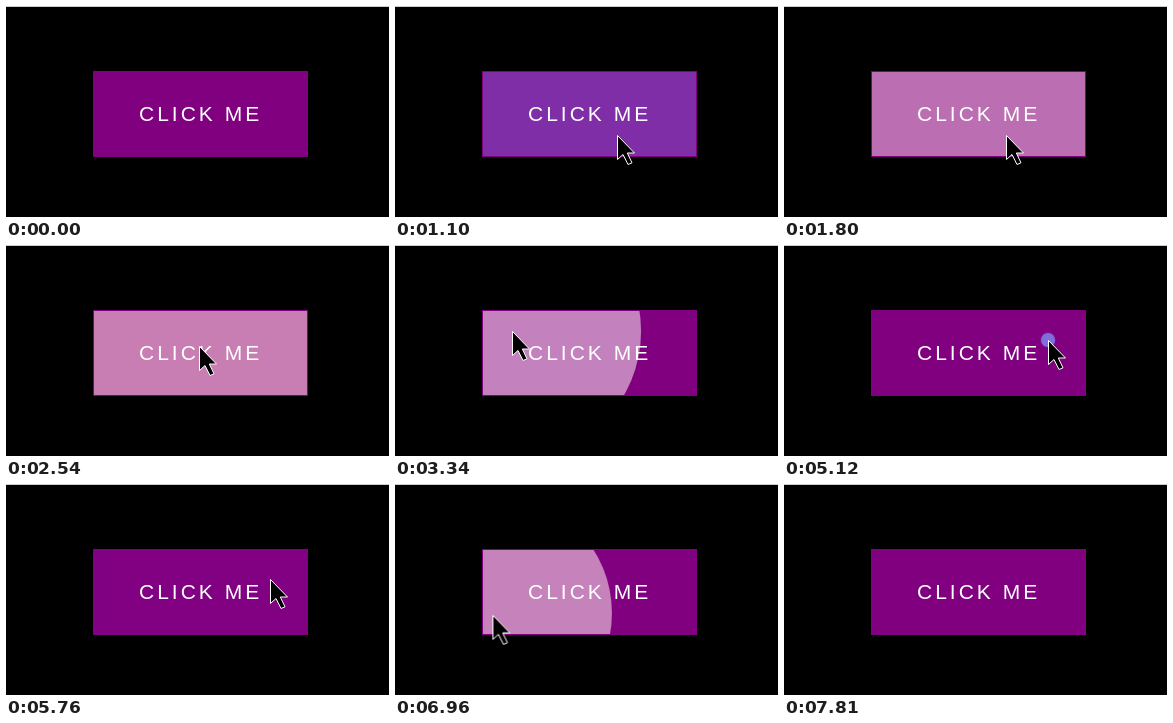
An HTML page that plays this animation: 383 px wide and 211 px high, repeating every 8.31 s.

```html
<!DOCTYPE html>
<html lang="en">
<head>
<meta charset="utf-8">
<title>Ripple button</title>
<style>
  html, body {
    margin: 0;
    width: 100%;
    height: 100%;
    overflow: hidden;
    background: #000;
  }

  .stage {
    position: relative;
    width: 383px;
    height: 211px;
    overflow: hidden;
    box-sizing: border-box;
    border-top: 1px solid #ccc;
  }

  .button {
    position: absolute;
    left: 87px;
    top: 64px;
    width: 213px;
    height: 84px;
    border: 1px solid #800080;
    background: #800080;
    overflow: hidden;
  }

  .label {
    position: absolute;
    left: 45px;
    top: 30px;
    font: 21px/24px "Liberation Sans", Arial, sans-serif;
    letter-spacing: 3px;
    white-space: nowrap;
    color: #fff;
  }

  /* --x and --y are stage coordinates of the click */
  .ripple {
    position: absolute;
    left: calc(var(--x) * 1px - 88px - 430px);
    top: calc(var(--y) * 1px - 66px - 430px);
    width: 860px;
    height: 860px;
    border-radius: 50%;
    background: var(--c);
    opacity: 0;
    animation: ripple 8310ms linear calc(var(--t) * 1ms) infinite;
  }

  @keyframes ripple {
    0% { transform: scale(0); opacity: 1; }
    7.94%, 100% { transform: scale(1); opacity: 0; }
  }

  .cursor {
    position: absolute;
    left: 0;
    top: -1px;
    width: 20px;
    height: 32px;
    transform: translate(400px, 250px);
    animation: move 8310ms ease-in-out infinite;
  }

  @keyframes move {
    0%, 1.91% { transform: translate(400px, 250px); }
    1.92% { transform: translate(289px, 197px); }
    5.53%, 25.87% { transform: translate(222px, 129px); }
    28.3%, 30.9% { transform: translate(193px, 101px); }
    34.9%, 40.91% { transform: translate(117px, 86px); }
    44.52%, 46.56% { transform: translate(89px, 67px); }
    46.57%, 48.49% { transform: translate(107px, 61px); }
    48.5%, 51.99% { transform: translate(107px, 79px); }
    57.52%, 59.56% { transform: translate(276px, 70px); }
    59.57%, 61.48% { transform: translate(258px, 64px); }
    61.5%, 69.55% { transform: translate(264px, 95px); }
    71.48%, 72.68% { transform: translate(254px, 94px); }
    79.54%, 83.03% { transform: translate(99px, 129px); }
    86.6% { transform: translate(81px, 150px); }
    91.46% { transform: translate(276px, 162px); }
    93.8% { transform: translate(308px, 205px); }
    93.95%, 100% { transform: translate(400px, 250px); }
  }
</style>
</head>
<body>
<div class="stage">
  <div class="button">
    <i class="ripple" style="--x:222; --y:129; --t:665; --c:#808af5"></i>
    <i class="ripple" style="--x:222; --y:129; --t:1550; --c:#e0b4d2"></i>
    <i class="ripple" style="--x:193; --y:101; --t:2355; --c:#e5b0c8"></i>
    <i class="ripple" style="--x:117; --y:86; --t:3143; --c:#e0bad9"></i>
    <i class="ripple" style="--x:107; --y:79; --t:4042; --c:#8363d3"></i>
    <i class="ripple" style="--x:264; --y:95; --t:5110; --c:#8070e0"></i>
    <i class="ripple" style="--x:99; --y:129; --t:6780; --c:#e0b4d2"></i>
    <span class="label">CLICK ME</span>
  </div>
  <svg class="cursor" viewBox="0 0 20 32">
    <path d="M.5 .5V24.5L6 19.5L11 29.5L15 27.8L10.3 18H17.5Z" fill="#000" stroke="#fff"/>
  </svg>
</div>
</body>
</html>
```
